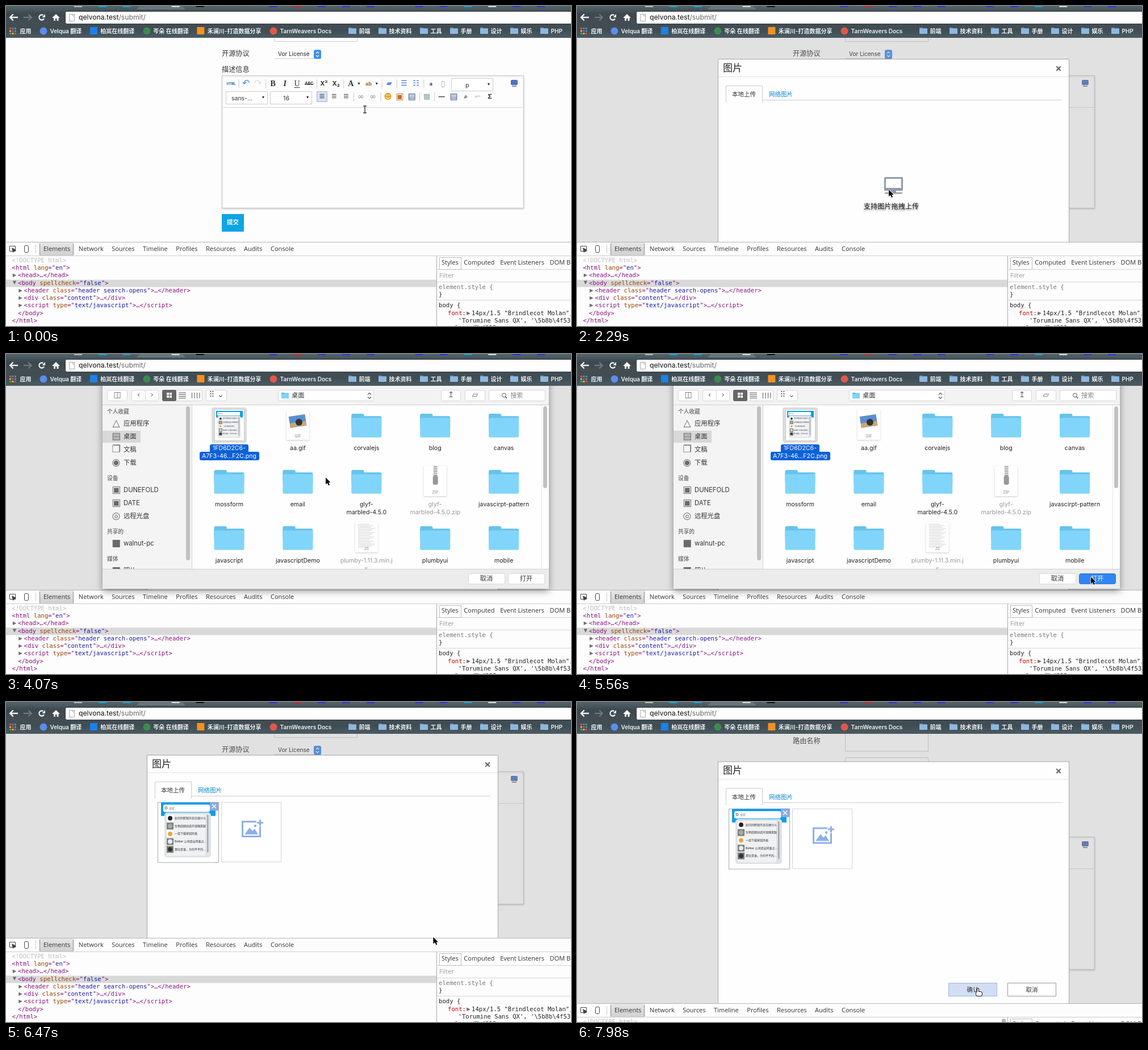
An HTML page with a canvas that plays this animation: 995x563 px, repeating every 8 s.

```html
<!DOCTYPE html>
<html lang="zh">
<meta charset="utf-8">
<title>Upload dialog</title>
<style>html,body{margin:0;width:995px;height:563px;overflow:hidden}canvas{display:block}</style>
<canvas width="995" height="563"></canvas>
<script>
const c = document.querySelector('canvas').getContext('2d');
const ui = (n, w = 400) => `${w} ${n}px Inter,"Noto Sans CJK SC",sans-serif`;
const icon = n => `${n}px "DejaVu Sans",sans-serif`;
const serif = s => `${s} 14px "Liberation Serif",serif`;
const dev = '11px "Open Sans","Noto Sans CJK SC",sans-serif';
const mono = '10.6px "DejaVu Sans Mono",monospace';

// ---- drawing helpers
function text(s, x, y, font, color = '#333', align = 'left') {
  c.font = font; c.fillStyle = color; c.textAlign = align; c.textBaseline = 'middle';
  c.fillText(s, x, y);
  return c.measureText(s).width;
}
const mid = (s, x, y, font, color) => text(s, x, y, font, color, 'center');
function row(items, x, y, gap, font, color) {
  for (const s of items) x += text(s, x, y, font, color) + gap;
}
function box(x, y, w, h, fill, stroke, r = 0) {
  const o = stroke ? .5 : 0;
  c.beginPath(); c.roundRect(x + o, y + o, w - 2 * o, h - 2 * o, r);
  if (fill) { c.fillStyle = fill; c.fill(); }
  if (stroke) { c.strokeStyle = stroke; c.lineWidth = 1; c.stroke(); }
}
function disc(x, y, r, fill, stroke) {
  c.beginPath(); c.arc(x, y, r, 0, 7);
  if (fill) { c.fillStyle = fill; c.fill(); }
  if (stroke) { c.strokeStyle = stroke; c.lineWidth = 1; c.stroke(); }
}
function trace(p) {
  c.beginPath();
  for (let i = 0; i < p.length; i += 2) c.lineTo(p[i], p[i + 1]);
}
function line(color, w, ...p) { trace(p); c.strokeStyle = color; c.lineWidth = w; c.stroke(); }
function poly(color, ...p) { trace(p); c.closePath(); c.fillStyle = color; c.fill(); }
const across = (x, y, end, color = '#ccc') => line(color, 1, x, y + .5, end, y + .5);
const down = (x, y, end, color = '#ccc') => line(color, 1, x + .5, y, x + .5, end);
function cross(x, y, r, color, w) {
  for (const d of [r, -r]) line(color, w, x - r, y - d, x + r, y + d);
}
function chevron(x, y, r, turn, color, w) {
  at(x, y, () => { c.rotate(turn * Math.PI / 2); line(color, w, -r / 2, -r, r / 2, 0, -r / 2, r); });
}
function grad(x0, y0, x1, y1, ...stops) {
  const g = c.createLinearGradient(x0, y0, x1, y1);
  stops.forEach((s, i) => g.addColorStop(i / (stops.length - 1), s));
  return g;
}
function at(x, y, draw, s = 1) { c.save(); c.translate(x, y); c.scale(s, s); draw(); c.restore(); }
function clipped(x, y, w, h, draw) {
  c.save(); c.beginPath(); c.rect(x, y, w, h); c.clip(); draw(); c.restore();
}
function shadowed(color, blur, dy, draw) {
  c.save(); c.shadowColor = color; c.shadowBlur = blur; c.shadowOffsetY = dy; draw(); c.restore();
}
function folder(x, y, w, front, back) {
  const h = w * .79, r = w * .05;
  box(x, y, w * .42, h / 2, back, null, r);
  box(x, y + h * .1, w, h / 2, back, null, r);
  box(x, y + h * .18, w, h * .82, front, null, r);
}

// ---- browser frame
function bookmarks(x, items) {
  const font = ui(10, 600), ink = '#f0f3f4';
  for (const [s, mark] of items) {
    mark(x);
    x += 33 + text(s, x + 18.5, 44.5, font, ink);
  }
}
function browser() {
  box(0, 0, 995, 56, grad(0, 0, 0, 56, '#52666b', '#3d484e', '#434d52', '#3f4d54', '#4c5b62'));
  poly('#65777c', 236, 0, 310, 0, 316, 6, 230, 6);
  const tabs = { g: '#bbb', c: '#12a5dc', w: '#ddd', k: '#111', b: '#2a35d8', r: '#d8232a' };
  [...'gcc.wk..brbbb.bbcwbb'].forEach((k, i) => tabs[k] && box(120 + i * 42.9, 0, 14, 2, tabs[k]));
  const ink = '#f4f6f7', pale = '#6d767c';
  across(8, 19.5, 21, ink); line(ink, 2.4, 8, 20, 21, 20); chevron(10, 20, 5.5, 2, ink, 2.4);
  line(pale, 2.4, 31, 20, 44, 20); chevron(42, 20, 5.5, 0, pale, 2.4);
  c.beginPath(); c.arc(63, 20, 4.6, .5, 5.3); c.strokeStyle = ink; c.lineWidth = 2.2; c.stroke();
  poly(ink, 69, 14, 69, 20, 63.5, 20);
  poly(ink, 88, 14, 95, 21, 81, 21); box(84, 20, 3, 6, ink); box(89.5, 20, 3, 6, ink); box(84, 20, 8, 2, ink);
  box(104, 9, 900, 23, '#fefefe', '#2f383e', 3);
  box(111, 14, 10, 13, '#fff', '#aaa'); box(117, 14, 4, 4, '#fff', '#aaa');
  row(['qelvona.test'], 128, 20.5, 0, ui(12.2), '#111');
  text('/submit/', 128 + c.measureText('qelvona.test').width, 20.5, ui(12.2), '#666');

  const round = k => x => disc(x + 7, 44, 6.5, k), square = k => x => box(x, 37, 13, 13, k, null, 1);
  const dots = x => {
    for (let i = 0; i < 9; i++) box(x + i % 3 * 4.5, 38 + (i / 3 | 0) * 4.5, 3, 3, ['#e8503a', '#eab52e', '#46a45b', '#4c86e8'][i * 3 % 4]);
  };
  const dir = x => folder(x, 38, 14, '#8fb8e0', '#6f9cca');
  bookmarks(6, [['应用', dots], ['Velqua 翻译', round('#5b8def')], ['柏岚在线翻译', square('#1b82e8')],
    ['岑朵 在线翻译', round('#3c8b4e')], ['禾澜川-打造数据分享', square('#f3921e')], ['TarnWeavers Docs', round('#e2574c')]]);
  bookmarks(603, ['前端', '技术资料', '工具', '手册', '设计', '娱乐', 'PHP'].map(s => [s, dir]));
}

// ---- web page
const toolStyle = {
  HTML: [ui(5.5, 800), '#3a7ab8'], '↶': [icon(16), '#4a86d0'], '↷': [icon(16), '#d3dbe6'],
  B: [serif('bold')], I: [serif('italic bold')], U: [serif('normal')], ABC: [ui(7, 700)], A: [serif('bold')],
  ab: [ui(9, 700), '#a0642a'], '▰': [icon(13), '#5b8fd8'], '☰': [icon(13), '#4a74c8'], '☷': [icon(13), '#4a74c8'],
  a: [ui(9, 700), '#345'], '▯': [icon(14), '#aaa'], '∞': [icon(14), '#888'], '☻': [icon(14), '#e8a52c'],
  '▣': [icon(15), '#c8692a'], '▤': [icon(15), '#3d5688'], '▩': [icon(13), '#86a9a0'], '⌐': [icon(14), '#dfa878']
};
function tools(s, x, y) {
  for (const k of s.split(' ')) {
    if (k == '|') { down(x - 8, y - 8, y + 8); x += 5; continue; }
    if (k == '▾') { mid(k, x - 7, y, icon(8), '#222'); x += 10; continue; }
    const [font, color] = toolStyle[k] || [ui(11, 700)];
    mid(k, x, y, font, color);
    if (k == 'U') across(x - 5, y + 6, x + 5, '#333');
    if (k == 'ABC') across(x - 8, y, x + 8, '#333');
    x += 21.2;
  }
}
function select(x, y, s) {
  box(x, y, 74, 23, '#fff', '#ccc');
  mid(s, x + 28.5, y + 12.5, ui(10.5));
  mid('▾', x + 66, y + 10.5, icon(8), '#222');
}
function editor(hover) {
  shadowed('#0003', 3, 1, () => box(380, 122, 532, 234, '#fdfdfd', '#cdcdcd'));
  across(382, 178, 911, '#d5d5dc');
  box(547, 150, 19, 19, '#d8e0f2', '#a9b8d8');
  if (hover) box(684, 150, 20, 20, '#e8edf8', '#b5c4e0');
  tools('HTML | ↶ ↷ | B I U ABC | X² X₂ | A ▾ ab ▾ | ▰ | ☰ ☷ | a ▯', 396.5, 137);
  tools('≡ ≡ ≡ | ∞ ∞ | ☻ ▣ ▤ | ▩ | — ▤ ⌕ ⌐ Σ', 556.5, 160);
  select(784, 127, 'p'); select(387, 150, 'sans-...'); select(465, 150, '16');
  box(889, 130, 12, 9, '#4a70d0', '#667', 1); box(891, 140, 8, 2, '#8a8fa0');
}
function page(hover) {
  box(0, -200, 995, 800, '#fdfdfd');
  const label = ui(12.2);
  text('路由名称', 380, -46, label);
  for (const i of [0, 1, 2]) box(472, -63 + i * 45.5, 147, 35, '#fff', '#c8ccd4');
  text('开源协议', 380, 84, label);
  across(473, 92, 555); text('Vor License', 479, 85, ui(10), '#222');
  box(542, 77, 13, 16, '#3d8ff0', null, 3);
  chevron(548.5, 82, 2.5, -1, '#fff', 1.2); chevron(548.5, 88, 2.5, 1, '#fff', 1.2);
  text('描述信息', 380, 112.5, label);
  editor(hover);
  box(380, 366, 39, 31, '#0ea5e6', null, 1);
  mid('提交', 399.5, 381, ui(10.5, 700), '#fff');
}

// ---- picture dialog
function shot() {
  box(0, 0, 96, 97, '#fff');
  box(0, 0, 96, 24, '#0b9fe6');
  box(4, 4, 82, 13, '#fff', null, 3);
  disc(9, 10, 2, null, '#555'); text('搜索', 14, 10.5, ui(5), '#888');
  box(6, 18, 82, 79, '#dfe2e6', null, 5);
  box(10, 21, 68, 73, '#f0f1f3');
  box(81, 22, 2.5, 66, '#a4a7ab', null, 1);
  ['如何判断程序员在做什么', '生物周期创造开源隔离服', '一组下载按钮风格', 'Bolkar 公司提出将重点...', '那位是谁，为何平平的...'].forEach((s, i) => {
    const y = 28 + i * 13.7;
    box(10, y - 6, 12, 12, i % 2 || i == 4 ? '#7b8078' : '#fff');
    disc(16, y, 4, ['#222', '#a9aba5', '#e8a83a', '#e6eaec', '#333'][i]);
    text(s, 24, y, ui(5, 500));
  });
}
function dialog(loaded, ok) {
  box(248, 93, 619, 460, '#fefefe', '#a5a5a5');
  text('图片', 257, 109.5, ui(17), '#222');
  cross(848, 110, 3.8, '#6b6b6b', 2.3);
  across(249, 124, 866, '#e2e2e2');
  line('#ccc', 1, 262.5, 170, 262.5, 140.5, 326.5, 140.5, 326.5, 170);
  across(327, 165, 853);
  text('本地上传', 273, 156, ui(10.5));
  text('网络图片', 338, 156, ui(10.5), '#0e88d0');
  if (loaded) {
    box(267, 176, 108, 107, '#fff', '#aaa');
    at(273, 176.5, shot);
    box(359, 176, 15, 15, '#8ca9e2'); cross(366.5, 183.5, 3.5, '#fff', 1.4);
    box(379, 176, 106, 106, '#fff', '#d4d4d4');
    at(434, 222, () => {
      const k = '#8fafe8';
      line(k, 3, 7, -11.5, -17.5, -11.5, -17.5, 14.5, 13.5, 14.5, 13.5, -3);
      poly(k, -14, 11, -5, -1, 0, 5, 4, 1, 10, 11); disc(5, -4, 2.2, k);
      line(k, 3, 13.5, -15, 13.5, -4); line(k, 3, 8, -9.5, 19, -9.5);
    });
  } else {
    const k = '#919bad';
    box(541, 301, 33, 24, k, null, 2); box(544, 304, 27, 16, '#fff');
    box(553, 325, 9, 3, k); box(542, 328, 31, 2.5, k, null, 1);
    shadowed('#0008', 3, 2, () => mid('支持图片拖拽上传', 553.5, 353, ui(12.2, 500), '#222'));
  }
  box(654, 482.5, 86, 24, ok ? '#d2def3' : '#fff', ok ? '#9db8e0' : '#999');
  mid('确认', 697, 495, ui(10.5));
  box(758, 482.5, 86, 24, '#fff', '#999');
  mid('取消', 801, 495, ui(10.5));
}

// ---- developer tools
function markup(s, x, y) {
  const parts = s.split(/(\w+(?==")|(?<==")[^"]*(?="))/);
  parts.forEach((p, i) => {
    const color = s[1] == '!' ? '#c0c0c0' : !(i % 2) ? '#881280' : parts[i + 1][0] == '=' ? '#994500' : '#1a1aa6';
    x += text(p, x, y, mono, color);
  });
}
function devtools() {
  const ink = '#222', rule = '#c80000';
  box(0, 415, 995, 263, '#fdfdfd');
  across(0, 415, 995, '#b5b5b5'); across(0, 439, 995);
  box(6, 422, 11, 10, null, '#444'); poly('#444', 10, 425, 18, 429, 12, 434);
  box(32, 421, 8, 13, null, '#444', 2);
  down(52, 420, 435);
  box(59, 416, 60, 23, grad(0, 416, 0, 439, '#e6e6e6', '#d0d0d0'));
  down(59, 418, 438, '#888'); down(118, 418, 438, '#888');
  row(['Elements', 'Network', 'Sources', 'Timeline', 'Profiles', 'Resources', 'Audits', 'Console'], 66, 428, 14.5, dev);
  box(0, 481.5, 758, 13, '#d9d9d9');
  // two leading characters per level; a triangle marks a node that can fold
  ['  <!DOCTYPE html>', '  <html lang="en">', '  ▶ <head>…</head>', '  ▼ <body spellcheck="false">',
   '    ▶ <header class="header search-opens">…</header>', '    ▶ <div class="content">…</div>',
   '    ▶ <script type="text/javascript">…<\/script>', '    </body>', '  </html>'].forEach((s, i) => {
    const x = s.indexOf('<') * 5.25, y = 448 + i * 13.25, mark = s.match(/[▶▼]/);
    if (mark) mid(mark[0], x - 6, y - .5, icon(8.5), '#6e6e6e');
    markup(s.trim().replace(/^[▶▼] /, ''), x, y);
  });
  down(758, 440, 680, '#aaa');
  for (const y of [463, 485, 517]) across(759, y, 995, '#d5d5d5');
  box(763, 442, 39, 22, '#fff', '#bbb');
  row(['Styles', 'Computed', 'Event Listeners', 'DOM Breakpoints'], 767, 452.5, 9.7, dev);
  text('Filter', 763, 475.5, dev, '#999');
  text('element.style {', 762, 495, mono, '#777'); text('}', 762, 508.5, mono, ink);
  text('body {', 762, 527.5, mono, ink);
  text('font:', 778, 541.5, mono, rule); mid('▶', 814.5, 541, icon(8.5), '#6e6e6e');
  text('14px/1.5 "Brindlecot Molan",', 820, 541.5, mono, ink);
  text("'Torumine Sans QX', '\\5b8b\\4f53", 796.5, 554.5, mono, ink);
  text('color:', 778, 567.5, mono, rule);
  box(824, 562, 9, 9, '#333', '#888'); text('#333', 838, 567.5, mono, ink);
}

// ---- file sheet
function leaf(x, y, label, draw) {
  shadowed('#0003', 3, 1, () => box(x - 20, y, 40, 53, '#fff', null, 1));
  draw();
  mid(label, x, y + 47, ui(7, 500), '#999');
}
function files(selected) {
  const names = ['1FD6D2C6-|A7F3-46...F2C.png', 'aa.gif', 'corvalejs', 'blog', 'canvas', 'mossform', 'email', 'glyf-|marbled-4.5.0',
    'glyf-|marbled-4.5.0.zip', 'javascirpt-pattern', 'javascript', 'javascriptDemo', 'plumby-1.11.3.min.j|s', 'plumbyui', 'mobile'];
  names.forEach((name, i) => {
    const x = 393 + i % 5 * 120.9, y = 98 + 99 * (i / 5 | 0), on = selected && !i;
    const dim = /zip|min/.test(name);
    if (on) {
      box(362, 94, 62, 62, '#dcdcdc', null, 4);
      box(359, 159, 68, 15, '#0b61d9', null, 3); box(341, 172, 105, 15, '#0b61d9', null, 3);
    }
    if (/png/.test(name)) {
      box(x - 26, y - 1, 53, 56, '#fff', '#ccc'); at(x - 23, y + 2, shot, .49);
    } else if (/gif/.test(name)) leaf(x, y, 'GIF', () => {
      at(x, y + 19, () => { c.rotate(-.15); box(-15, -9, 29, 20, '#5b8fd0'); box(-15, 3, 29, 8, '#c9a677'); });
      disc(x + 2, y + 22, 6, '#333');
    });
    else if (/zip/.test(name)) leaf(x, y, 'ZIP', () => {
      for (let j = 0; j < 6; j++) box(x - 3, y + j * 3, 7, 2, '#aaa');
      box(x - 4, y + 17, 9, 16, '#999', null, 3);
    });
    else if (/min/.test(name)) leaf(x, y, 'JS', () => {
      for (let j = 0; j < 17; j++) across(x - 15, y + 3 + j * 2.5, x + 5 + j * 7 % 11, '#d2d2d2');
    });
    else folder(x - 26.5, y + 7, 53, '#82d5fa', '#66c3ec');
    name.split('|').forEach((s, j) => mid(s, x, y + 68 + j * 14, ui(10.6), on ? '#fff' : dim ? '#999' : '#222'));
  });
}
function sidebar() {
  box(170, 135, 67, 21, '#d8d8d8');
  let y = 75;
  for (const group of ['个人收藏 △应用程序 ▤桌面 ❐文稿 ◉下载', '设备 ▣DUNEFOLD ▣DATE ◎远程光盘', '共享的 ■walnut-pc', '媒体 ■照片']) {
    const [head, ...items] = group.split(' ');
    text(head, 178, y += 27, ui(9.7, 600), '#7d7d7d');
    items.forEach((s, i) => {
      y += i ? 23 : 21;
      mid(s[0], 194, y, icon(17), '#6a6a6a');
      text(s.slice(1), 207, y, ui(11.3));
    });
  }
  box(317, 92, 7, 271, '#c1c1c1', null, 3.5);
}
function sheetBar() {
  for (const [x, w, s] of [[178, 36, '◫'], [221, 25, '‹'], [245, 24, '›'], [275, 71, ''], [352, 37, '⠿ ⌄'], [479, 169, ''],
    [766, 35, '↥'], [808, 36, '▱'], [850, 100, '']]) {
    box(x, 63, w, 20, '#fff', '#d5d5d5', 3);
    mid(s, x + w / 2, 72.5, icon(14), '#666');
  }
  box(275, 63, 25, 20, '#666', null, 3);
  for (let i = 0; i < 4; i++) {
    box(283 + i % 2 * 5, 68 + (i >> 1) * 5, 4, 4, '#fff');
    across(304, 68 + i * 3, 317, '#555'); down(327 + i * 4.5, 68, 78, '#555');
  }
  folder(485, 68, 13, '#7fd3f7', '#4db4e4'); text('桌面', 503, 73.5, ui(11.3));
  chevron(640, 70, 3, -1, '#555', 1.2); chevron(640, 77, 3, 1, '#555', 1.2);
  disc(877, 72.5, 3.5, null, '#555'); line('#555', 1.3, 879.5, 75, 882, 78);
  text('搜索', 888, 73.5, ui(11.3), '#888');
}
function sheet(full, selected, pressed) {
  shadowed('#0006', 12, 4, () => box(170, 40, 786, 373, '#ececec'));
  box(170, 40, 786, 50, '#f3f3f3');
  box(170, 90, 157, 288, '#f4f4f4'); box(328, 90, 628, 288, '#fefefe');
  down(327, 90, 378, '#d4d4d4');
  for (const y of [89, 378]) across(170, y, 956, '#cfcfcf');
  if (full) {
    sheetBar();
    clipped(170, 90, 786, 288, () => {
      sidebar(); files(selected);
      down(943, 90, 378, '#e8e8e8');
      box(946, 92, 7, 144, '#c1c1c1', null, 3.5);
    });
  }
  const button = (s, x, on, hot) => {
    box(x, 386, 65, 19, hot ? '#2f86f0' : on ? '#fff' : '#f0f0f0', hot ? '#2a74d4' : '#d8d8d8', 3);
    mid(s, x + 32, 395.5, ui(11.3), hot ? '#fff' : on ? '#333' : '#b0b0b0');
  };
  button('取消', 814, full); button('打开', 884, selected, pressed);
}

// ---- pointers
const pointers = {
  arrow() {
    const p = [0, 0, 0, 12, 3, 9.6, 5, 14, 7, 13, 5, 9, 8.5, 8.7];
    line('#fff', 1.5, ...p, 0, 0); poly('#000', ...p);
  },
  beam() {
    line('#222', 1.3, 0, -6, 0, 6);
    for (const y of [-6, 6]) line('#222', 1.3, -3, y, 3, y);
  },
  split() {
    line('#fff', 4, 0, -6, 0, 6);
    line('#000', 1.5, 0, -5, 0, 5); line('#000', 1.5, -4, 0, 4, 0);
    for (const s of [1, -1]) poly('#000', -3.5, 3.5 * s, 0, 7.5 * s, 3.5, 3.5 * s);
  },
  hand() {
    box(-2, 0, 4, 11, '#fff', '#000', 2);
    box(-4, 6, 12, 9, '#fff', '#000', 3);
    box(-1, 2, 2, 8, '#fff');
  }
};

// ---- timing: motion advances in steps of about 149 ms
function progress(t, start, end) {
  const n = Math.round((end - start) / 149);
  return Math.max(0, Math.min(n, Math.floor(n * (t - start) / (end - start) + .1))) / n;
}
const moves = [[150, 480, 684, 161], [920, 2290, 549, 323], [3030, 3620, 392, 130], [3770, 4660, 905, 392],
  [5560, 6620, 727, 417], [6780, 7090, 723, 525], [7570, 7810, 706, 503]];
function mouse(t) {
  let x = 632, y = 182;
  for (const [start, end, tx, ty] of moves) {
    const p = progress(t, start, end);
    x += (tx - x) * p; y += (ty - y) * p;
  }
  return [x, y];
}
function slide(t) {
  const opening = (1 - progress(t, 2590, 3178)) ** 2, closing = 1 - (1 - progress(t, 5560, 6010)) ** 2;
  return -332 * opening - 396 * closing;
}

function draw(t) {
  const modal = t >= 920, tall = t >= 7330, lag = t >= 7090 && !tall;
  const shift = tall ? 115 : lag ? 2.5 : 0;
  at(0, shift, () => page(t >= 480 && !modal));
  if (modal) {
    box(0, 56, 995, 507, 'rgba(150,150,150,.28)');
    at(0, tall ? 11.5 : 0, () => dialog(t >= 6160, t >= 7810));
  }
  if (lag) {
    // the panel is caught halfway through its redraw
    box(0, 417, 995, 146, '#fdfdfd');
    clipped(0, 437, 995, 126, () => at(0, 12.5, devtools));
  } else at(0, shift, devtools);
  if (tall) box(748, 557, 7, 12, '#b5b5b5', null, 3.5);
  if (t >= 2590 && t < 6010) at(0, slide(t), () => sheet(t >= 3320, t >= 3770, t >= 5110));
  browser();
  const kind = t < 480 ? 'beam' : t >= 7810 ? 'hand' : t >= 6620 && t < 7570 ? 'split' : 'arrow';
  at(...mouse(t), pointers[kind]);
}
const start = performance.now();
function tick(now) {
  draw(Math.max(0, now - start) % 8000);
  requestAnimationFrame(tick);
}
draw(0);
requestAnimationFrame(tick);
</script>
</html>
```
